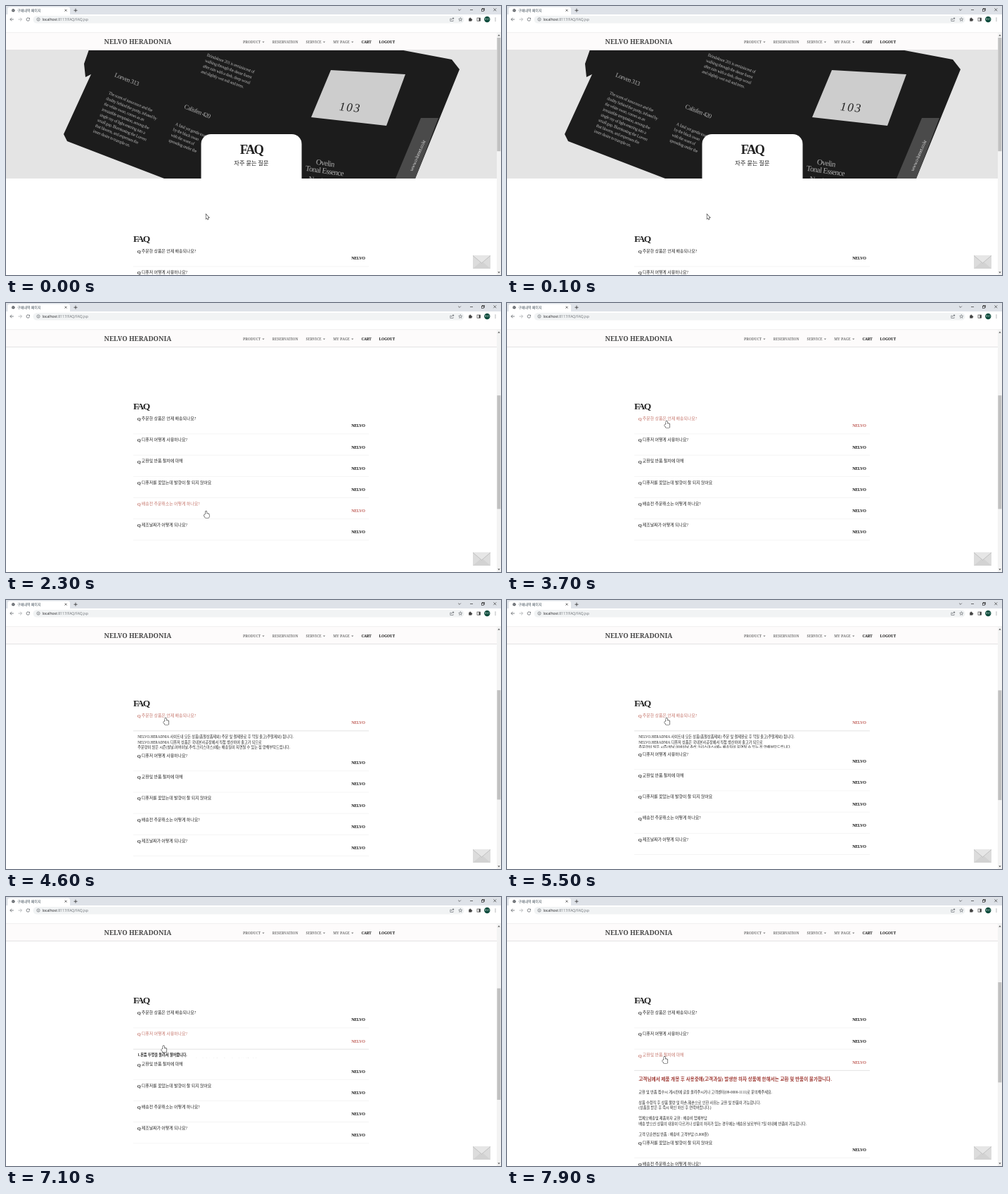
An HTML page with a canvas that plays this animation: 704 by 382 pixels, repeating every 8 s.

```html
<!DOCTYPE html>
<html lang="ko">
<head>
<meta charset="utf-8">
<title>FAQ</title>
<style>
html, body { margin: 0; width: 100%; height: 100%; overflow: hidden; background: #fff; }
canvas { display: block; width: 704px; height: 382px; }
</style>
</head>
<body>
<canvas id="stage"></canvas>
<script>
const W = 704, H = 382, LOOP = 8000, STEP = 100;
const TOP = 38, VIEW = H - TOP, PAGE = 704;
const SERIF = '"Liberation Serif", "Noto Sans CJK KR", "Noto Sans CJK", serif';
const NAV = '"Noto Serif", serif';
const SANS = '"Open Sans", "Noto Sans CJK KR", "Noto Sans CJK", sans-serif';
const BRAND = 'NELVO';
const INK = '#222', RED = '#c5766c', ICON = '#5f6368', DARK = '#333';

const cv = document.getElementById('stage');
const g = cv.getContext('2d');
const dpr = window.devicePixelRatio || 1;
cv.width = W * dpr;
cv.height = H * dpr;

const ROW = 30.2, FIRST = 348, LINE = 7.45, SLIDE = 400;
const LEFT = 181, WIDTH = 335;

// '#' marks a heading line, an empty string a blank line
const rows = [
  { label: '주문한 상품은 언제 배송되나요?', open: 4310, close: 5370, lines: [
    BRAND + '.HERADNIA 사이트내 모든 상품(품절상품제외) 주문 및 결제완료 후 익일 출고(주말제외) 됩니다.',
    BRAND + '.HERADNIA 디퓨저 상품은 국내본사공장에서 직접 생산하여 출고가 되므로',
    '주문량이 많은 시즌(설날,어버이날,추석,크리스마스)에는 배송일이 지연될 수 있는 점 양해부탁드립니다.'
  ] },
  { label: '디퓨저 어떻게 사용하나요?', open: 6080, close: 6840, bold: true, lines: [
    '1.본품 뚜껑을 돌려서 열어줍니다.',
    '2.유리병용기를 손으로 잡고 가위등을 이용하여 속마개를 잡고 비틀어 분리합니다.',
    '(용액이 새는 것을 방지하기 위해 고무마개가 꽉 껴져있으므로 속마개의 틈사이를 이용해 조심히 분리하시길 권합니다)',
    '3.속마개 분리 후 뚜껑을 다시 닫아줍니다.',
    '4.섬유스틱을 취향에 맞게 꽂아줍니다.'
  ] },
  { label: '교환및 반품 절차에 대해', open: 7560, close: LOOP, lines: [
    '#고객님께서 제품 개봉 후 사용중에(고객과실) 발생한 하자 상품에 한해서는 교환 및 반품이 불가합니다.',
    '', '',
    '교환 및 반품 접수시 게시판에 글을 올려주시거나 고객센터(09-0000-1111)로 문의해주세요.',
    '',
    '상품 수령직 후 상품 불량 및 파손,훼손으로 인한 사유는 교환 및 반품이 가능합니다.',
    '(상품을 받은 후 즉시 확인 하신 후 연락바랍니다.)',
    '',
    '업체오배송및 제품하자 교환 : 배송비 업체부담',
    '배송 받으신 상품의 내용이 다르거나 상품의 하자가 있는 경우에는 배송된 날로부터 7일 이내에 반품이 가능합니다.',
    '',
    '고객 단순변심 반품 : 배송비 고객부담 (5,000원)'
  ] },
  { label: '디퓨저를 꽂았는데 발향이 잘 되지 않아요' },
  { label: '배송전 주문취소는 어떻게 하나요?' },
  { label: '제조날짜가 어떻게 되나요?' }
];

const start = { x: 284.5, y: 296 };
const moves = [
  { from: 2600, to: 3200, x: 162, y: 190 },
  { from: 3200, to: 3500, x: 227, y: 168 },
  { from: 5800, to: 5900, x: 224, y: 195 },
  { from: 6500, to: 6700, x: 224, y: 211.5 },
  { from: 7100, to: 7400, x: 224, y: 227 }
];

const ramp = (t, a, b) => Math.min(1, Math.max(0, (t - a) / (b - a)));
const swing = (t, a) => 0.5 - Math.cos(ramp(t, a, a + SLIDE) * Math.PI) / 2;

function pointerAt(t) {
  return moves.reduce((p, m) => {
    const k = ramp(t, m.from, m.to);
    return { x: p.x + (m.x - p.x) * k, y: p.y + (m.y - p.y) * k };
  }, start);
}

function heightAt(row, t) {
  if (!row.lines) return 0;
  return (10 + row.lines.length * LINE) * (swing(t, row.open) - swing(t, row.close));
}

// y is the vertical centre of the letters
function text(s, x, y, size, o = {}) {
  g.font = `${o.style || ''} ${o.weight || 'normal'} ${size}px ${o.family || SERIF}`;
  g.textAlign = o.align || 'left';
  g.letterSpacing = (o.track || 0) + 'px';
  g.fillStyle = o.color || INK;
  g.fillText(s, x, y + size * 0.35);
  return g.measureText(s).width;
}

function rect(x, y, w, h, c) {
  g.fillStyle = c;
  g.fillRect(x, y, w, h);
}

function round(x, y, w, h, r, c) {
  g.beginPath();
  g.roundRect(x, y, w, h, r);
  g.fillStyle = c;
  g.fill();
}

function trace(pts, close) {
  g.beginPath();
  for (let i = 0; i < pts.length; i += 2) g.lineTo(pts[i], pts[i + 1]);
  if (close) g.closePath();
}

function poly(c, ...pts) {
  trace(pts, true);
  g.fillStyle = c;
  g.fill();
}

function stroke(c, w, ...pts) {
  trace(pts, false);
  g.strokeStyle = c;
  g.lineWidth = w;
  g.stroke();
}

function frame(x, y, w, h, c) {
  g.strokeStyle = c;
  g.lineWidth = 0.7;
  g.strokeRect(x, y, w, h);
}

function ring(x, y, r, c, w, a = 0, b = Math.PI * 2) {
  g.beginPath();
  g.arc(x, y, r, a, b);
  g.strokeStyle = c;
  g.lineWidth = w;
  g.stroke();
}

function disc(x, y, r, c) {
  g.beginPath();
  g.arc(x, y, r, 0, Math.PI * 2);
  g.fillStyle = c;
  g.fill();
}

function clipped(x, y, w, h, paint) {
  g.save();
  g.beginPath();
  g.rect(x, y, w, h);
  g.clip();
  paint();
  g.restore();
}

function print(x, y, deg, size, lines, o = {}) {
  g.save();
  g.translate(x, y);
  g.rotate(deg * Math.PI / 180);
  lines.forEach((s, i) => text(s, 0, i * size * 1.32, size, { color: '#b0b0b0', track: -size * 0.06, ...o }));
  g.restore();
}

function box() {
  rect(0, 62, 698, 183, '#e4e4e4');
  poly('#1c1c1c', 118, 62, 111, 82, 113, 101, 121, 97, 82, 182, 87, 192,
    225, 245, 582, 245, 645, 90, 634, 76, 560, 62);
  poly('#4a4a4a', 590, 159, 615, 159, 582, 245, 554, 245);
  poly('#cdcdcd', 462, 91, 568, 97, 541, 170, 434, 158);
  print(474, 142, 6, 17, ['103'], { color: INK, style: 'italic', track: 2 });

  print(155, 97, 22, 9, ['Lorven 313']);
  print(146, 123, 22, 6.3, [
    'The scent of innocence and the', 'duality behind the purity, infused by',
    'the white swan, comes as an', 'irresistible temptation, among the',
    'single ray of light entering into a', 'small gap. Illuminating the Lorven',
    'that blooms, and expresses the', 'inner desire to trample on.'
  ]);
  print(254, 142, 22, 9, ['Calisfen 420']);
  print(241, 167, 22, 6.3, [
    'A fatal yet gentle touch', 'by the black swan', 'with the scent of', 'spreading under the'
  ]);
  print(286, 69, 20, 6.3, [
    'Brindalmor 201 is reminiscent of', 'walking through the dense forest',
    'after rain with a dark, deep wood', 'and slightly wet soil and trees.'
  ]);
  print(441, 221, 8, 11, ['Ovelin']);
  print(426, 230, 8, 11, ['Tonal Essence', '   No. 103']);
  print(576, 234, -67, 7, ['www.o-lumet.co.kr'], { color: '#d8d8d8' });
}

function hero() {
  clipped(0, 62, 698, 183, box);
  round(277.5, 182, 143, 64, [14, 14, 0, 0], '#fff');
  text('FAQ', 349, 203.5, 18.5, { weight: 'bold', align: 'center', track: -1.8 });
  text('자주 묻는 질문', 349, 223, 8.2, { align: 'center' });
}

function answer(row, edge) {
  row.lines.forEach((s, i) => {
    const y = edge + 9 + i * LINE;
    if (s[0] === '#') text(s.slice(1), 187.3, y + LINE / 2, 6.6, { weight: 'bold', color: '#a03c36' });
    else text(s, 187.3, y, 5.13, { weight: row.bold && s[0] !== '(' ? 'bold' : 'normal' });
  });
}

function list(t, scroll, mouse) {
  text('FAQ', LEFT, 330, 13.4, { weight: 'bold', track: -1.6 });
  let shift = 0, over = false;
  rows.forEach((row, i) => {
    const y = FIRST + ROW * i + shift, edge = y + 21.5, my = mouse.y + scroll;
    const hot = t >= 2300 && mouse.x > LEFT && my > edge - ROW && my <= edge;
    const color = hot ? RED : INK;
    over = over || hot;
    text('Q', 186.8, y + 1, 6.3, { color, weight: 'bold', track: -0.4 });
    text(row.label, 192.8, y, 5.9, { color });
    text(BRAND, 510.5, y + 10.2, 6, { color: hot ? '#c0605a' : '#111', weight: 'bold', align: 'right', track: -0.3 });
    const h = heightAt(row, t);
    rect(LEFT, edge, WIDTH, 0.8, h > 1 ? '#dcdcdc' : '#f2f2f2');
    if (h > 0.3) clipped(LEFT, edge, WIDTH, h, () => answer(row, edge));
    shift += h;
  });
  return { over, shift };
}

function navbar() {
  rect(0, TOP, 698, 24, '#fdfbfb');
  rect(0, 62, 698, 1, '#e4e2e4');
  text(BRAND + ' HERADONIA', 139.6, 50.5, 9.4, { family: NAV, weight: 600, color: '#444' });
  let x = 337;
  for (const s of ['PRODUCT▾', 'RESERVATION', 'SERVICE▾', 'MY PAGE▾', 'CART', 'LOGOUT']) {
    const menu = s.endsWith('▾');
    const color = s === 'CART' || s === 'LOGOUT' ? '#111' : '#777';
    x += text(menu ? s.slice(0, -1) : s, x, 51, 5.1, { family: NAV, weight: 600, color });
    if (menu) {
      poly(color, x + 2.2, 50.5, x + 5.4, 50.5, x + 3.8, 52.2);
      x += 5.6;
    }
    x += 11;
  }
}

function scrollbar(scroll, extra) {
  const k = 330 / (PAGE + extra);
  rect(698, TOP, 6, VIEW, '#f3f3f3');
  rect(698.4, 45 + scroll * k, 5, VIEW * k, '#c1c1c1');
  for (const [y, d] of [[42.5, -2], [377.5, 2]]) poly('#555', 699.3, y, 702.7, y, 701, y + d);
}

function cross(x, y, r) {
  stroke(DARK, 0.7, x - r, y - r, x + r, y + r);
  stroke(DARK, 0.7, x - r, y + r, x + r, y - r);
}

// d is -1 for back, 1 for forward
function arrow(x, d, c) {
  const tip = x + 2.5 * d;
  stroke(c, 0.8, x - 2.5 * d, 19, tip, 19);
  stroke(c, 0.8, tip - 2.3 * d, 16.7, tip, 19, tip - 2.3 * d, 21.3);
}

function star(x, y) {
  const pts = [];
  for (let i = 0; i <= 10; i++) {
    const r = i % 2 ? 1.2 : 2.7, a = Math.PI * (i / 5 - 0.5);
    pts.push(x + r * Math.cos(a), y + r * Math.sin(a));
  }
  stroke(ICON, 0.6, ...pts);
}

function browser() {
  rect(0, 0, W, TOP, '#fff');
  rect(0, 0, W, 12, '#dee2e8');
  rect(0, TOP - 0.6, W, 0.8, '#e9e9e9');

  round(2.5, 1.5, 88.5, 12, [3, 3, 0, 0], '#fff');
  disc(10.3, 6.2, 2.3, ICON);
  stroke('#fff', 0.5, 8.6, 5.6, 10.2, 6.4, 11.6, 5);
  text('구매내역 페이지', 16, 6.2, 5, { family: SANS, color: '#3c4a55' });
  cross(85, 6.2, 1.5);
  cross(695.3, 5.3, 1.9);
  rect(96.5, 5.8, 5, 0.8, DARK);
  rect(98.6, 3.7, 0.8, 5, DARK);
  stroke(DARK, 0.7, 643.2, 4.6, 645, 6.4, 646.8, 4.6);
  rect(660, 5.2, 4, 0.7, DARK);
  frame(677.6, 3.4, 2.9, 2.9, DARK);
  rect(676.4, 4.3, 3.1, 3.1, '#dee2e8');
  frame(676.6, 4.4, 2.9, 2.9, DARK);

  round(38.5, 14, 613, 10.4, 5.2, '#f1f3f4');
  arrow(8.3, -1, ICON);
  arrow(20, 1, '#a8abae');
  ring(31.3, 19, 2.2, ICON, 0.8, 0.2, 5.5);
  poly(ICON, 32, 18.4, 34, 18.4, 34, 16.4);
  ring(46, 19, 2.2, ICON, 0.6);
  rect(45.7, 18.6, 0.7, 1.8, ICON);
  rect(45.7, 17.6, 0.7, 0.6, ICON);
  const host = text('localhost', 51.5, 19, 5.1, { family: SANS, color: '#202124' });
  text(':8117/FAQ/FAQ.jsp', 51.5 + host, 19, 5.1, { family: SANS, color: '#6b7075' });

  stroke(ICON, 0.6, 633, 18, 631.8, 18, 631.8, 21.5, 636, 21.5, 636, 20);
  stroke(ICON, 0.6, 633.2, 20, 634, 18, 636.5, 17.6);
  poly(ICON, 635.6, 16, 637.4, 17.6, 635.6, 19.2);
  star(646.3, 19.2);
  rect(658.2, 17.6, 4, 4, '#444');
  disc(660.2, 17.3, 0.9, '#444');
  disc(662.4, 19.6, 0.9, '#444');
  frame(670, 17, 4.6, 4.2, '#444');
  rect(672.5, 17, 2.1, 4.2, '#444');
  disc(684.3, 19, 4.2, '#0d4b3c');
  text('NVO', 684.3, 19, 3, { family: SANS, color: '#cfe0da', align: 'center' });
  for (let y = 17; y <= 21; y += 2) disc(696, y, 0.6, ICON);
}

function envelope() {
  const x = 664, y = 354, w = 25, h = 19, mid = x + w / 2;
  rect(x, y, w, h, '#dcdcdc');
  poly('#d2d2d2', x, y + h, mid, y + 8, x + w, y + h);
  poly('#e6e6e6', x, y, x + w, y, mid, y + 11);
  stroke('#b5b5b5', 0.7, x, y + 0.5, mid, y + 11, x + w, y + 0.5);
}

function pointer(x, y, hand) {
  g.save();
  g.translate(x, y);
  g.beginPath();
  if (hand) {
    g.roundRect(-0.8, -0.3, 1.8, 7, 0.9);
    g.roundRect(-1.6, 3.2, 6, 5.8, 1.6);
    g.roundRect(-2.9, 4.6, 3, 2.6, 1.2);
  } else {
    trace([0, 0, 0, 6, 1.3, 4.9, 2.3, 7, 3.2, 6.6, 2.3, 4.5, 4.1, 4.4], true);
  }
  g.strokeStyle = DARK;
  g.lineWidth = 1.2;
  g.stroke();
  g.fillStyle = '#fff';
  g.fill();
  g.restore();
}

function draw(time) {
  const t = Math.floor((time % LOOP) / STEP) * STEP;
  const scroll = t < 2000 ? 0 : t < 2100 ? 96 : 184;
  const mouse = pointerAt(t);
  let state;
  g.setTransform(dpr, 0, 0, dpr, 0, 0);
  rect(0, 0, W, H, '#fff');
  clipped(0, 62, 698, H - 62, () => {
    g.translate(0, -scroll);
    hero();
    state = list(t, scroll, mouse);
  });
  envelope();
  navbar();
  browser();
  scrollbar(scroll, state.shift);
  const settling = t >= 3500 && t < 3700;
  pointer(mouse.x, mouse.y, state.over && !settling);
}

function tick() {
  draw(performance.now());
  requestAnimationFrame(tick);
}
tick();
</script>
</body>
</html>
```
